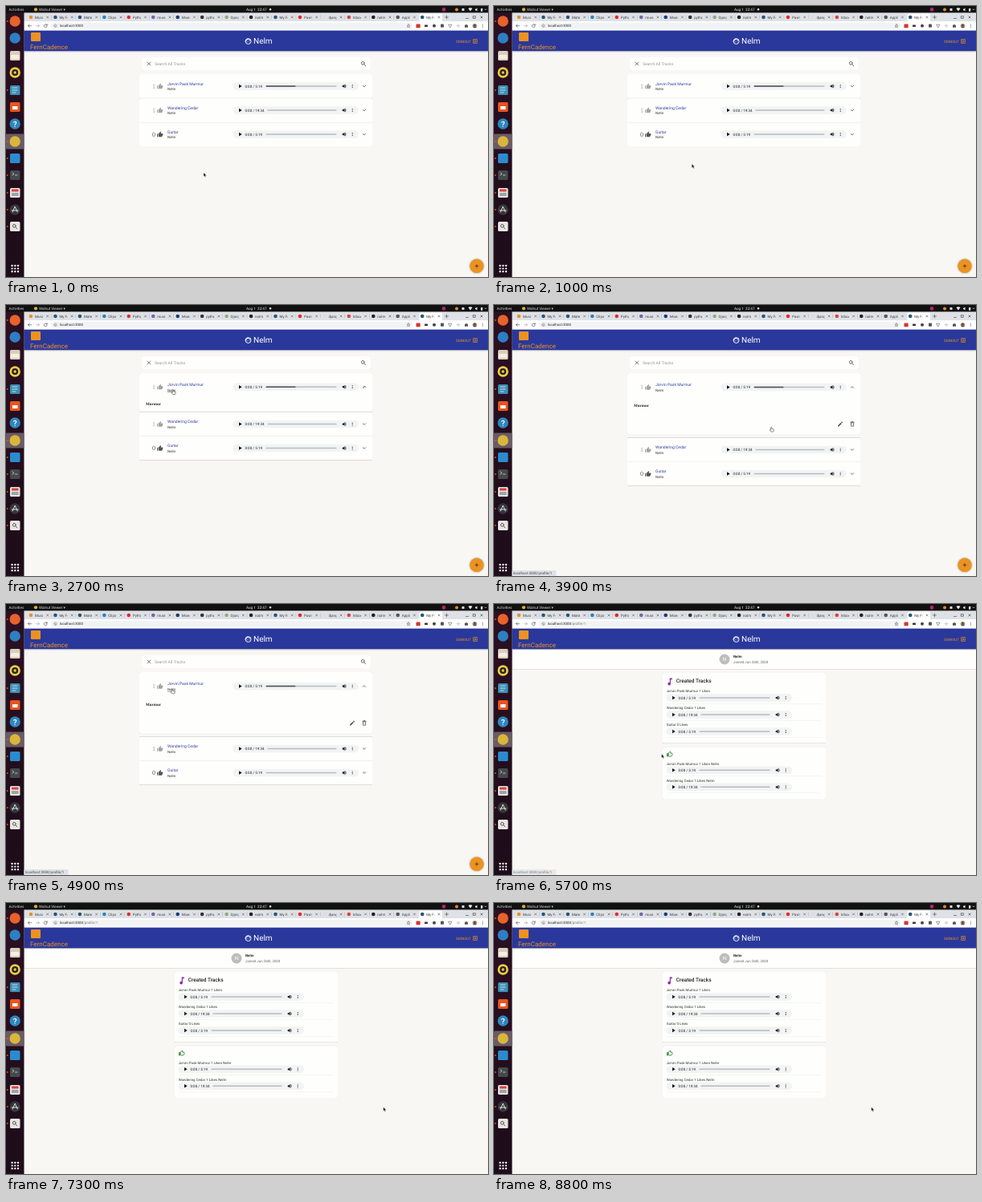
Recreate the animation shown at these times as an HTML page. Size 600 by 338 pixels, loop 9000 ms.

```html
<!DOCTYPE html>
<html lang="en">
<head>
<meta charset="utf-8">
<title>Track list</title>
<style>
  html, body { margin: 0; width: 100%; height: 100%; overflow: hidden; background: #f8f7f4; }
  svg { display: block; width: 100vw; height: 100vh; font-family: Roboto, sans-serif; text-rendering: geometricPrecision; }
  .card { fill: #fefefc; filter: drop-shadow(0 .7px .4px #0007); }
  .bar { filter: drop-shadow(0 .7px .8px #0006); }
  .line { fill: none; stroke-linecap: round; stroke-linejoin: round; }
</style>
</head>
<body>
<svg id="stage" viewBox="0 0 600 338"></svg>
<script>
const LOOP = 9000, STEP = 100;
const USER = "Nelm", APP = "FernCadence", BROWSER = "Walnut Viewer";
const TRACKS = [
  { title: "Jorvin Pask Murmur", length: "5:19", likes: 1, buffered: 37 },
  { title: "Wandering Cedar", length: "19:34", likes: 1 },
  { title: "Guitar", length: "5:19", likes: 0 }
];
const INK = "#333", INDIGO = "#303f9f", ORANGE = "#ed9220";

const rect = (x, y, w, h, fill, rx = 0, more = "") =>
  `<rect x="${x}" y="${y}" width="${w}" height="${h}" fill="${fill}" rx="${rx}" ${more}/>`;
const card = (x, y, w, h, id = "") => `<rect class="card" id="${id}" x="${x}" y="${y}" width="${w}" height="${h}" rx="1"/>`;
const dot = (x, y, r, fill, more = "") => `<circle cx="${x}" cy="${y}" r="${r}" fill="${fill}" ${more}/>`;
const text = (x, y, size, fill, str, more = "") =>
  `<text x="${x}" y="${y}" font-size="${size}" fill="${fill}" ${more}>${str}</text>`;
const line = (x, y, d, color, width = .8) =>
  `<path class="line" transform="translate(${x} ${y})" d="${d}" stroke="${color}" stroke-width="${width}"/>`;
const shape = (x, y, d, fill, scale = 1, more = "") =>
  `<path transform="translate(${x} ${y}) scale(${scale})" d="${d}" fill="${fill}" ${more}/>`;
const group = (id, body) => `<g id="${id}">${body}</g>`;

const CROSS = "M-2-2L2 2M2-2L-2 2", SMALL_CROSS = "M-1.1-1.1L1.1 1.1M1.1-1.1L-1.1 1.1";
const PLUS = "M-2 0H2M0-2V2", CHEVRON = "M-1.7-.8L0 .9L1.7-.8";
const THUMB = "M-11 9h4V-3h-4zM11-2c0-1-1-2-2-2H3l1-5-.5-1.5L2-11-5-4v11c0 1 1 2 2 2h9l2-1 3-7z";
const LENS = "M.8.8L2.6 2.6M1.2-.7A1.9 1.9 0 1 1-2.6-.7A1.9 1.9 0 1 1 1.2-.7";
const NOTE = "M0-4V2.2A2 2 0 1 0 1.3 3.8V-2H3.4V-4Z";

function player(x, y, track, buffered = 0) {
  const start = x + (track.length.length > 4 ? 43 : 41);
  return rect(x, y - 4.8, 156.5, 9.6, "#f1f3f4", 4.8) +
    shape(x + 7.5, y, "M0-2.2L3.7 0L0 2.2Z", "#111") +
    text(x + 15, y + 1.6, 4.5, "#222", `0:00 / ${track.length}`) +
    rect(start, y - .7, x + 129 - start, 1.4, "#b9bbbc", .6) +
    (buffered ? rect(start, y - .7, buffered, 1.4, "#505050", .6) : "") +
    shape(x + 138.6, y, "M-2.4-.9H-1.2L.4-2.2V2.2L-1.2.9H-2.4Z", "#111") +
    line(x + 138.6, y, "M1.3-1Q2 0 1.3 1M1.4-2Q3.5 0 1.4 2", "#111", .5) +
    [-1.6, 0, 1.6].map(d => dot(x + 148.7, y + d, .5, "#111")).join("");
}

function trackRow(track, i) {
  const y = 100 + 30 * i, tone = track.likes ? "#a3a3a3" : "#555";
  return text(182, y + 2.7, 8, tone, track.likes, 'font-family="Liberation Serif, serif"') +
    shape(191.7, y + .2, THUMB, tone, .33) +
    text(201, y - 1.3, 5, INDIGO, track.title) +
    text(201, y + 5.4, 4.4, INK, USER, i ? "" : 'id="owner"') +
    player(282.5, y, track, track.buffered) +
    group("chevron" + i, line(446, y, CHEVRON, "#555"));
}

function desktop() {
  const launchers = [
    [19, "#e8622c"], [40, "#2d7fc4"], [62, "#d8cfbd", 1], [83, "#f3cd45"], [105, "#3c8fb5", 1],
    [126, "#e95420", 1], [147, "#2f86bd"], [169, "#d9b63b"], [190, "#2b8bd0", 1],
    [211, "#45494a", 1], [233, "#e8e4e0", 1], [254, "#35363a"], [275, "#e9e5e2", 1]
  ];
  const running = [19, 105, 169, 190, 211, 233, 254, 275];
  let s = `<linearGradient id="dock" x2="0" y2="1"><stop stop-color="#2c1023"/><stop offset="1" stop-color="#1d0c19"/></linearGradient>` +
    rect(0, 0, 22.5, 338, "url(#dock)") + rect(0, 0, 600, 8.4, "#111") + rect(0, 159.5, 22.5, 19, "#6b5b66", 1);
  for (const [y, color, square] of launchers)
    s += square ? rect(5, y - 6, 12.5, 12, color, 1.5) : dot(11.2, y, 6.7, color);
  s += running.map(y => dot(1.8, y, .9, "#e95420")).join("");
  s += dot(11.2, 83, 4, "#222") + dot(11.2, 83, 1.7, "#f3cd45") + text(8.7, 150.6, 10, "#fff", "?", 'font-weight="500"') +
    line(8, 209, "M0-1L2 .5L0 2M3.5 2H6", "#eee", .7) +
    rect(7, 228.5, 8.5, 3, "#d94141") + rect(7, 233, 8.5, 4, "#9aa5aa") +
    line(11.2, 254, "M-3 3L0-4L3 3M-4 1H4", "#ddd", 1) + line(11, 275, LENS, "#555", 1) +
    line(8, 103, "M0-1H6M0 2H6M0 5H4", "#e3f3fa", .8) + rect(8, 125, 6.5, 4, "#fff") +
    rect(6, 61, 10.5, 5, "#f4eee3", .5);
  for (let i = 0; i < 9; i++) s += rect(6.5 + i % 3 * 3.7, 322.7 + (i / 3 | 0) * 3.7, 2.2, 2.2, "#eee", .6);
  s += text(3.5, 6, 4.6, "#ddd", "Activities") + dot(37, 4.3, 2.1, "#d9b63b") +
    text(41, 6, 4.6, "#ddd", BROWSER + " ▾") + text(299, 6, 4.6, "#eee", "Aug 1&#160; 22:47") + dot(329, 4.3, 1.2, "#eee") +
    dot(545, 4.4, 2.3, "#b52472") + dot(561, 4.4, 2, "#e78b24") +
    rect(567.5, 3, 3, 3, "#ddd", .5) + shape(578, 4.5, "M-2.5-1.5Q0-3 2.5-1.5L0 2Z", "#eee") +
    shape(586, 4.5, "M-2-.8H-1L.5-2V2L-1 .8H-2Z", "#eee") + rect(591, 3, 2.3, 3.7, "#eee", .4) + line(597, 4.4, "M-1-.4L0 .5L1-.4", "#eee", .6);
  return s;
}

function browserChrome() {
  const tabs = [
    ["Music", "#e99126"], ["My Fe", "#285576"], ["Mater", "#285576"], ["Clips", "#2686bd"], ["Pytho", "#e02b2b"],
    ["music", "#7366a8"], ["Mixes", "#173a78"], ["pytho", "#333"], ["Djang", "#8bae78"], ["nolma", "#222"],
    ["My Fe", "#285576"], ["Pavin", "#e02b2b"], ["djang", "#ddd"], ["Inbox", "#d9443a"], ["nolma", "#222"],
    ["Appli", "#555"], ["My Fe", "#285576"]
  ];
  let s = rect(22.5, 8.4, 578, 11, "#dee1e6") + rect(22.5, 19.2, 578, 11.4, "#fff") + rect(514.5, 9.5, 28.5, 10.5, "#fff", 1.5);
  tabs.forEach(([name, color], i) => {
    const x = 31 + i * 30.45;
    s += dot(x, 14, 2.3, color) + text(x + 5, 15.7, 4.5, "#3c4043", name) +
      rect(x + 15, 11, 3.2, 7, i === 16 ? "#fff" : "#dee1e6") + line(x + 20.7, 14, SMALL_CROSS, "#555", .6);
    if (i < 15) s += rect(x + 25.2, 11.5, .4, 5, "#a5a8ad");
  });
  s += line(548.5, 14, PLUS, "#555", .7) + line(574, 14.5, "M-1.4 1H1.4", "#333", .6) +
    line(583, 14, "M-1.3-1.3H1.3V1.3H-1.3Z", "#333", .6) + line(592, 14, SMALL_CROSS, "#333", .6) +
    line(29.5, 24.7, "M2 0H-2M-.3-1.7L-2 0L-.3 1.7", "#555", .7) + line(39.5, 24.7, "M-2 0H2M.3-1.7L2 0L.3 1.7", "#aaa", .7) +
    line(49.3, 24.7, "M1.6-1A2 2 0 1 0 1.9.5M1.9-2V-.6H.5", "#555", .7) +
    rect(56, 20.8, 450, 7.8, "#f1f3f4", 3.9) + line(61.5, 24.7, "M-1.8 0A1.8 1.8 0 1 1 1.8 0A1.8 1.8 0 1 1-1.8 0M0-.1V.8", "#666", .5) +
    text(67, 26.3, 4.4, "#222", 'localhost:3000<tspan id="path" fill="#777">/profile/1</tspan>') +
    line(501, 24.8, "M0-2L.6-.6L2-.5L.9.5L1.3 2L0 1.1L-1.3 2L-.9.5L-2-.5L-.6-.6Z", "#555", .5) +
    rect(510.5, 22.5, 5.2, 4.8, "#d8362f", .6) + rect(521, 23.5, 4, 2.6, "#4a3440", .6) +
    dot(533, 24.7, 2, "#444") + rect(541, 22.6, 4, 4.2, "#555", 1) + line(553, 24.7, "M-2-1.5H2L0 2Z", "#777", .7) +
    line(563, 24.7, "M-2 0H2M0-2V2", "#bbb", .8) + shape(573, 24.7, "M-2-1H-.6V-2H.6V-1H2V2H-2Z", "#555") +
    dot(583.5, 24.7, 2.8, "#a08770") + dot(583.5, 23.9, 1, "#40332c") + shape(583.5, 24.7, "M-1.9 2Q0-1 1.9 2Z", "#40332c") +
    [-1.6, 0, 1.6].map(d => dot(593.5, 24.7 + d, .5, "#555")).join("");
  return s;
}

function appHeader() {
  return rect(22.5, 30, 578, 26.2, "#2a389b", 0, 'class="bar"') +
    rect(31, 33, 12, 11, ORANGE, 1) + text(30, 54, 8, ORANGE, APP) +
    line(301.5, 44, "M-3.5 0A3.5 3.5 0 1 1 3.5 0A3.5 3.5 0 1 1-3.5 0M-3.2-.7Q-.8-1-.6-3Q.8-1 3.2-1.3", "#fff", .9) +
    dot(300.2, 44.8, .55, "#fff") + dot(302.9, 44.8, .55, "#fff") +
    text(308, 47.3, 10, "#fff", USER) + text(560, 45.6, 4.5, ORANGE, "SIGNOUT") +
    line(584, 44, "M-2.3-1V-2.4H2.4V2.4H-2.3V1M-2.7 0H1M-.3-1.3L1 0L-.3 1.3", ORANGE, .7);
}

function listPage() {
  const search = card(169, 64, 285, 16) + line(177.8, 72, CROSS, "#555", .8) +
    text(185, 73.8, 5, "#999", "Search All Tracks") + line(445, 72, LENS, "#444", .8);
  const details = text(174, 124.5, 5, "#222", "Murmur", 'font-family="Liberation Serif, serif" font-weight="600"') +
    shape(431, 146, "M-2.9 1.7V2.9H-1.7L1.8-.6L.6-1.8ZM1-2.2L2.2-1L2.9-1.7Q3.1-2 2.9-2.2L2.2-2.9Q1.9-3.1 1.7-2.9Z", "#555") +
    line(446, 146, "M-1.7-1.2L-1.4 2.7H1.4L1.7-1.2ZM-2.2-2.3H2.2M-.7-2.9H.7", "#555", .8);
  return search + card(166, 85, 290, 30, "firstCard") +
    `<clipPath id="fold"><rect id="foldArea" x="166" y="115" width="290" height="0"/></clipPath>` +
    `<g clip-path="url(#fold)">${group("details", details)}</g>` + group("firstRow", trackRow(TRACKS[0], 0)) +
    group("otherRows", card(166, 115, 290, 60) + rect(166, 114.8, 290, .5, "#e2e2e2", 0, 'id="seam"') +
      rect(166, 145, 290, .5, "#e2e2e2") + trackRow(TRACKS[1], 1) + trackRow(TRACKS[2], 2)) +
    dot(586, 324.3, 8.7, ORANGE, 'class="bar"') + line(586, 324.3, PLUS, "#333", .8);
}

function profilePage() {
  const item = (track, y, suffix = "") =>
    text(214.7, y - 6.6, 4.4, INK, `${track.title} ${track.likes} Likes${suffix}`) + player(214.5, y, track) +
    rect(214.5, y + 7, 193, .4, "#e6e6e6");
  return `<rect class="card" x="22.5" y="56.3" width="578" height="25"/>` +
    dot(287, 69, 6.5, "#bdbdbd") + text(284.8, 71.2, 6.2, "#fff", USER[0]) +
    text(298, 66.7, 4.4, "#222", USER, 'font-weight="600"') + text(298, 74, 4.4, "#666", "Joined Jun 26th, 2020") +
    card(210, 86, 203, 87.7) + shape(218.7, 96, NOTE, "#8e24aa", .9) +
    text(226.7, 98.4, 6.5, "#222", "Created Tracks", 'font-weight="500"') +
    TRACKS.map((track, i) => item(track, 117 + 21 * i)).join("") +
    card(210, 179, 203, 64) +
    shape(218.7, 187.3, THUMB, "none", .3, 'stroke="#2e7d32" stroke-width="2.8"') +
    TRACKS.slice(0, 2).map((track, i) => item(track, 207.3 + 21 * i, " " + USER)).join("");
}

const statusBar = rect(22.5, 331, 55, 7, "#dee1e6", .8) + text(24, 336.2, 4.5, "#444", "localhost:3000/profile/1");
const arrow = shape(0, 0, "M0 0V5L1.2 4L2 5.8L2.9 5.4L2.1 3.7H3.6Z", "#111", 1, 'stroke="#fff" stroke-width=".35"');
const hand = shape(0, 0, "M-.7.4Q0-.5.6.4V2.2L2.6 2.6Q3.2 2.9 3 3.8L2.5 5.8H-.3L-2.1 3.5Q-1.9 2.6-.7 3.6Z", "#fff", 1,
  'stroke="#222" stroke-width=".5"');

const stage = document.getElementById("stage");
stage.innerHTML = rect(0, 0, 600, 338, "#f8f7f4") + group("list", listPage()) + group("profile", profilePage()) +
  appHeader() + browserChrome() + desktop() + group("status", statusBar) + group("arrow", arrow) + group("hand", hand);

const $ = id => document.getElementById(id);
const set = (id, name, value) => $(id).setAttribute(name, value);
const show = (id, visible) => { $(id).style.display = visible ? "" : "none"; };
const clamp = v => Math.min(1, Math.max(0, v));

// The cubic-bezier(.4, 0, .2, 1) curve, solved for x by bisection.
function ease(x) {
  x = clamp(x);
  let low = 0, high = 1;
  for (let i = 0; i < 20; i++) {
    const u = (low + high) / 2, v = 1 - u;
    if (1.2 * v * v * u + .6 * v * u * u + u ** 3 < x) low = u; else high = u;
  }
  return low * low * (3 - 2 * low);
}

const pointer = [
  [0, 246, 207.7], [800, 246, 207.7], [1700, 248, 122], [1800, 247, 121], [2400, 208, 105.7], [3600, 208, 105.7],
  [3900, 345.3, 152.3], [4150, 385, 153], [4600, 212, 107], [4900, 207, 106], [5000, 207, 106],
  [5700, 208.5, 187], [5900, 209, 189], [6000, 209, 189], [6400, 335, 226], [6600, 335, 226],
  [7000, 469.7, 254.5], [LOOP, 469.7, 254.5]
];

function pointerAt(t) {
  const i = pointer.findIndex(key => key[0] > t);
  const [t0, x0, y0] = pointer[i - 1], [t1, x1, y1] = pointer[i];
  const u = (t - t0) / (t1 - t0), k = u * u * (3 - 2 * u);
  return [x0 + (x1 - x0) * k, y0 + (y1 - y0) * k];
}

function draw(t) {
  const open = ease((t - 2610) / 300), turn = ease((t - 2610) / 150);
  const onProfile = t >= 5100, height = 30 + 46 * open;
  show("list", !onProfile);
  show("profile", onProfile);
  show("path", onProfile);
  set("firstCard", "height", height);
  set("foldArea", "height", height - 30);
  set("firstRow", "transform", `translate(0 ${2.5 * turn})`);
  set("details", "transform", `translate(0 ${2.5 * open})`);
  set("otherRows", "transform", `translate(0 ${50.5 * open})`);
  set("seam", "opacity", 1 - open);
  set("chevron0", "transform", `rotate(${180 * turn} 446 100)`);
  set("owner", "text-decoration", (t >= 2300 && t < 3700) || (t >= 4600 && !onProfile) ? "underline" : "none");

  show("status", (t >= 2900 && t < 4100) || (t >= 4600 && t < 5900));
  set("status", "opacity", clamp((5900 - t) / 300));

  const pointing = t >= 1300 && !onProfile;
  show("hand", pointing);
  show("arrow", !pointing);
  set(pointing ? "hand" : "arrow", "transform", `translate(${pointerAt(t)})`);
}

function tick() {
  draw(Math.floor(performance.now() % LOOP / STEP) * STEP);
  requestAnimationFrame(tick);
}
tick();
</script>
</body>
</html>
```
